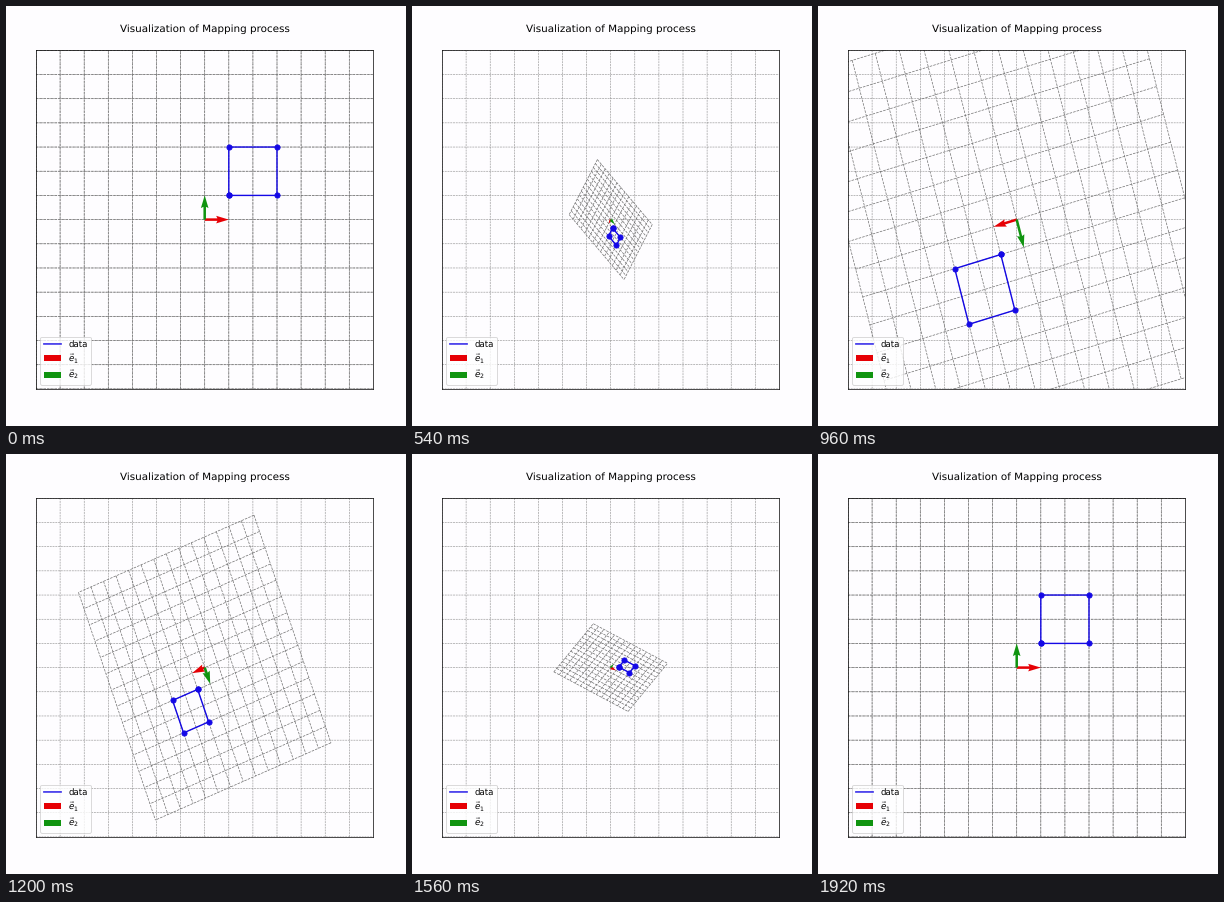
A matplotlib script that plays this animation: 400x420 px, repeating every 1980 ms.

```python
import numpy as np
import matplotlib.pyplot as plt
from matplotlib.animation import FuncAnimation
from matplotlib.collections import LineCollection

W, H, DPI = 400, 420, 62.5
FRAMES, INTERVAL = 33, 60
R = 7
PAPER, BLUE, RED, GREEN = "#fefdff", "#1408e6", "#e60005", "#109410"

# Columns are the images of the two basis vectors.
TARGET = np.array([[-1.0, 0.3], [-0.3, -1.2]])

plt.rcParams.update({"font.family": "DejaVu Sans", "text.hinting": "none"})
fig = plt.figure(figsize=(W / DPI, H / DPI), dpi=DPI, facecolor=PAPER)
ax = fig.add_axes([30 / W, 1 - 382.9 / H, 337.4 / W, 338.6 / H],
                  facecolor=PAPER)
ax.set(xlim=(-R, R), ylim=(-R, R))
ticks = np.arange(-R, R + 1)
ax.set_xticks(ticks)
ax.set_yticks(ticks)
ax.tick_params(length=0, labelbottom=False, labelleft=False)
ax.grid(color="gray", linestyle="--", linewidth=0.6, snap=False)
ax.set_axisbelow(True)
fig.text(198.8 / W, 1 - 26 / H, "Visualization of Mapping process",
         fontsize=12, ha="center")

rows = [[(-R, k), (R, k)] for k in ticks]
cols = [[(k, -R), (k, R)] for k in ticks]
net = np.array(rows + cols, float)
square = np.array([(1, 1), (3, 1), (3, 3), (1, 3), (1, 1)], float)

mesh = LineCollection(net, colors="#707070", linewidths=0.8,
                      linestyles="--", zorder=2, snap=False)
ax.add_collection(mesh, autolim=False)
outline, = ax.plot(*square.T, color=BLUE, lw=1.6, zorder=4, label="data",
                   snap=False)
dots, = ax.plot(*square.T, "o", color=BLUE, ms=6, zorder=4, snap=False)


def arrow(vec, color, label):
    return ax.quiver([0], [0], [vec[0]], [vec[1]], color=color, label=label,
                     angles="xy", scale_units="xy", scale=1, zorder=3)


arrows = [arrow((1, 0), RED, r"$\vec{e}_1$"),
          arrow((0, 1), GREEN, r"$\vec{e}_2$")]
legend = ax.legend(loc="lower left", fontsize=10, labelspacing=0.31)
for key in legend.get_lines():
    key.set_snap(False)


def progress(i):
    """Linear ramp up and back, resting at both ends of the loop."""
    if i in (0, FRAMES - 1):
        return 0.0
    return min(0.0622 * i - 0.018, 0.0617 * (32.32 - i))


def update(i):
    t = progress(i)
    m = (1 - t) * np.eye(2) + t * TARGET
    mesh.set_segments(list(net @ m.T))
    pts = square @ m.T
    for line in (outline, dots):
        line.set_data(pts[:, 0], pts[:, 1])
    for q, vec in zip(arrows, m.T):
        q.set_UVC([vec[0]], [vec[1]])
    return [mesh, outline, dots, *arrows]


anim = FuncAnimation(fig, update, frames=FRAMES, interval=INTERVAL,
                     repeat=True, repeat_delay=0)
plt.show()
```
